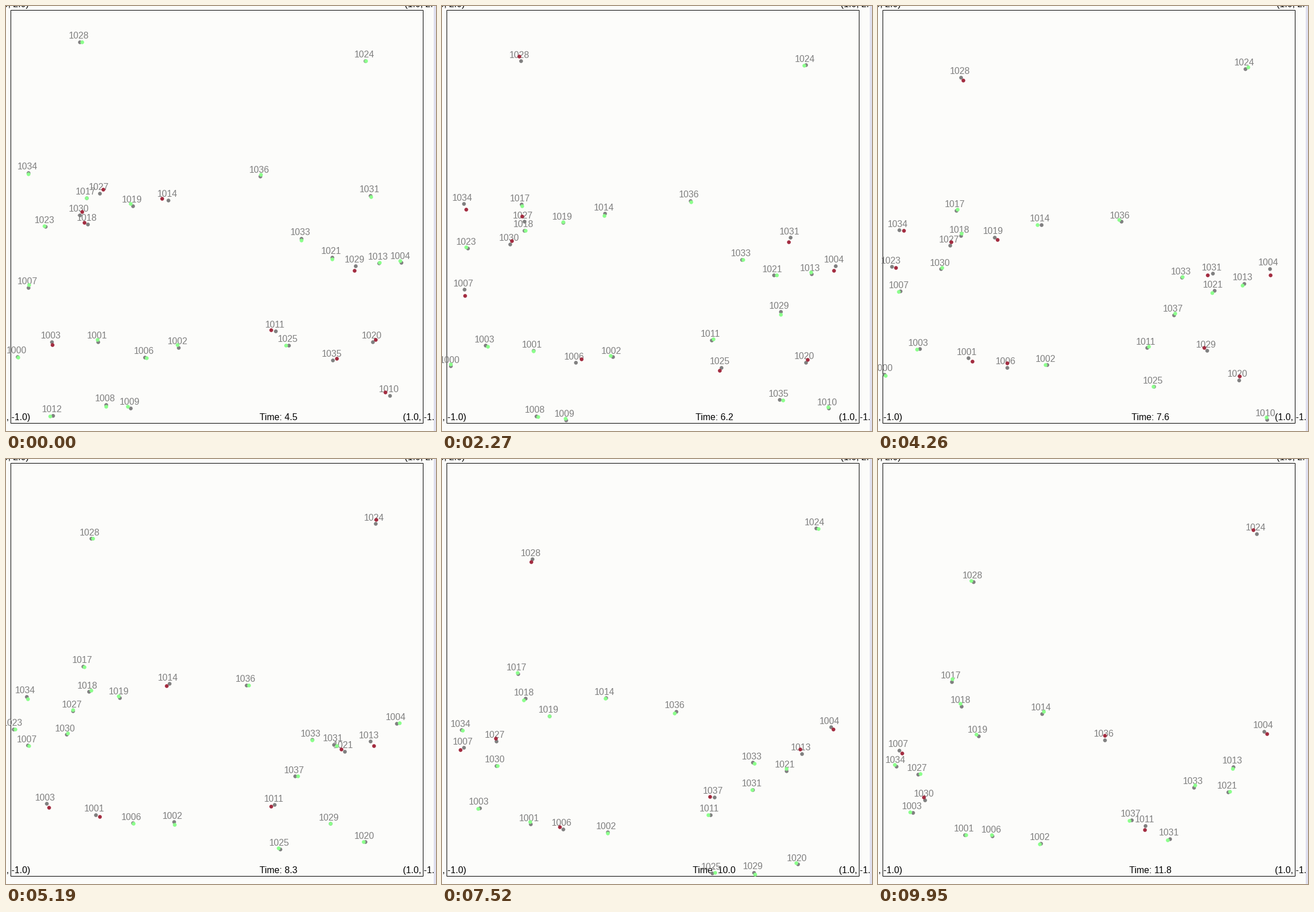
Write a matplotlib script that moves like this. It is 753 by 744 pixels and loops after 9.97 s.

```python
import matplotlib.pyplot as plt
import numpy as np
from matplotlib.animation import FuncAnimation
from matplotlib.patches import Rectangle

W, H = 753, 744
DPI = 64
PX = 72 / DPI  # points per pixel
LEFT, TOP, RIGHT, BOTTOM = 8, 7, 730, 730

FRAMES, INTERVAL = 169, 59
STEPS = 73
START_TIME, STEP_TIME = 4.5, 0.1

BACK, STRIP = "#fcfcfa", "#dfdfee"
GRAY, GREEN, RED = "#808080", "#8cff8c", "#a32c40"

UNUSED = (5, 15, 16, 22, 26, 32)
LATE_ID, LATE_STEP = 1037, 31
ids = np.array([1000 + i for i in range(38) if i not in UNUSED])

# Key points by id: where a node starts, and how far it drifts in one loop
starts = np.array([
    (20, 613), (161, 587), (302, 597), (80, 587), (692, 448), (243, 614),
    (39, 492), (175, 697), (218, 703), (672, 681), (472, 568), (82, 716),
    (653, 449), (284, 339), (141, 335), (143, 381), (222, 349), (642, 587),
    (571, 439), (69, 385), (629, 95), (495, 593), (164, 327), (129, 62),
    (612, 454), (129, 365), (638, 331), (517, 406), (39, 291), (572, 619),
    (445, 297), (569, 477)])
drifts = np.array([
    (-24, 76), (-9, 70), (-17, 75), (-19, 31), (-16, 28), (-43, 45),
    (-2, 17), (-49, 91), (-9, 95), (20, 103), (-4, 73), (-15, 88),
    (-31, 89), (3, 106), (-12, 54), (3, 51), (-46, 135), (-26, 164),
    (42, 143), (-111, 173), (34, 35), (-30, 177), (-94, 224), (38, 152),
    (-89, 363), (-47, 231), (-127, 333), (36, 168), (-7, 246), (85, 313),
    (-48, 194), (-125, 154)])

# Every step draws a new estimate of each node; the spread shrinks with time
rng = np.random.default_rng(7)
spread = np.linspace(4.4, 3.3, STEPS + 1)[:, None, None]
errors = rng.normal(0, spread, (STEPS + 1, len(ids), 2))

fig = plt.figure(figsize=(W / DPI, H / DPI), dpi=DPI, facecolor=BACK)
ax = fig.add_axes([0, 0, 1, 1])
ax.set_xlim(0, W)
ax.set_ylim(H, 0)
ax.axis("off")


def caption(x, y, text, color="black"):
    """Text centred on x with its baseline at y."""
    return ax.text(x, y, text, color=color, size=16 * PX, ha="center",
                   va="baseline", family="Liberation Sans", zorder=2)


def dots(color, z):
    return ax.plot([], [], "o", ms=6.6 * PX, mew=0, color=color, zorder=z)[0]


def place(line, points):
    line.set_data(*(points + .5).T)  # pixel centres


def ease(u):
    """Nearly steady, slightly speeding up."""
    return u * (.94 + .06 * u)


LIFT = 5  # from a point up to the baseline of its caption
ax.add_patch(Rectangle((LEFT + .5, TOP + .5), RIGHT - LEFT, BOTTOM - TOP,
                       fill=False, ec="black", lw=PX, snap=False, zorder=1))
ax.add_patch(Rectangle((749, 0), W - 749, H, fc=STRIP, lw=0, zorder=6))
for cx, xval in ((LEFT, "0.0"), (RIGHT, "1.0")):
    caption(cx, TOP - LIFT, f"({xval}, 2.0)")
    caption(cx, BOTTOM - LIFT, f"({xval}, -1.0)")

clock = caption(477, BOTTOM - LIFT, "")
labels = [caption(0, 0, str(i), GRAY) for i in ids]
actual, good, bad = dots(GRAY, 3), dots(GREEN, 4), dots(RED, 4)


def update(frame):
    k = round(frame * STEPS / (FRAMES - 1))
    pos = starts + drifts * ease(k / STEPS)
    guess = pos + errors[k]
    inside = (pos[:, 0] >= LEFT) & (pos[:, 1] <= BOTTOM)
    shown = inside & ((ids != LATE_ID) | (k >= LATE_STEP))
    near = np.hypot(errors[k, :, 0] * .75, errors[k, :, 1]) < 4.95

    place(actual, pos[shown])
    place(good, guess[shown & near])
    place(bad, guess[shown & ~near])
    for label, (x, y), on in zip(labels, pos, shown):
        label.set_position((x - 1.5, y - LIFT))
        label.set_visible(on)
    clock.set_text(f"Time: {START_TIME + k * STEP_TIME:.1f}")
    return [actual, good, bad, clock, *labels]


anim = FuncAnimation(fig, update, frames=FRAMES, interval=INTERVAL,
                     init_func=lambda: update(0), repeat=True, repeat_delay=0)
plt.show()
```
